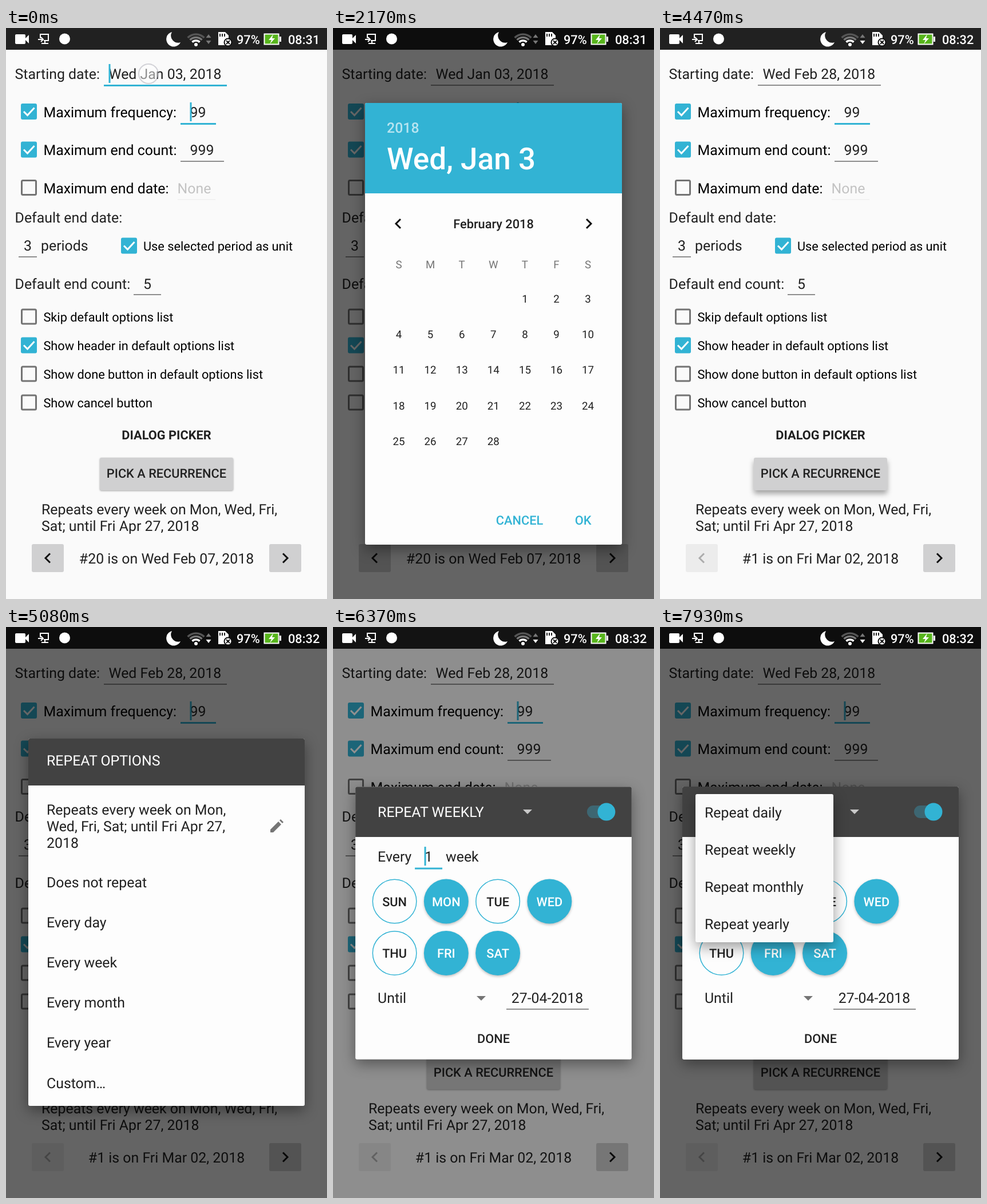
An HTML page that plays this animation: 561x998 px, repeating every 7.99 s.

```html
<!DOCTYPE html>
<html lang="en">
<head>
<meta charset="utf-8">
<title>Recurrence picker demo</title>
<style>
html, body { margin: 0; width: 100%; height: 100%; overflow: hidden; background: #fafafa; }
svg { display: block; width: 561px; height: 998px; }
text { font: 24.86px Roboto, sans-serif; fill: #212121; text-rendering: geometricPrecision; }
text.s { font-size: 21.77px; }
text.d { font-size: 18.7px; }
text.h { font-size: 53px; }
text.m { font-weight: 500; }
text.b { font-weight: 700; }
text.c { text-anchor: middle; }
text.k { fill: #000; }
text.w { fill: #fff; }
text.g { fill: #757575; }
text.a { fill: #32b3d4; }
.shadow { filter: drop-shadow(0 8px 12px rgba(0,0,0,.4)); }
</style>
</head>
<body>
<svg id="stage" viewBox="0 0 561 998"></svg>
<script>
const ACCENT = '#32b3d4', BUTTON = '#d0d0d1', LOOP = 7990;

const text = (x, y, str, cls = '', extra = '') => `<text x="${x}" y="${y}" class="${cls}" ${extra}>${str}</text>`;
const rect = (x, y, w, h, fill, extra = '') => `<rect x="${x}" y="${y}" width="${w}" height="${h}" fill="${fill}" ${extra}/>`;
const circle = (x, y, r, fill, extra = '') => `<circle cx="${x}" cy="${y}" r="${r}" fill="${fill}" ${extra}/>`;
const path = (d, fill, extra = '') => `<path d="${d}" fill="${fill}" ${extra}/>`;
const group = (id, body, extra = '') => `<g id="${id}" ${extra}>${body}</g>`;
const line = (x1, x2, y) => rect(x1, y - .75, x2 - x1, 1.5, '#6b6b6b');
const caret = (id, x, y) => rect(x - 1.5, y, 3, 33, ACCENT, `id="${id}"`);
const triangle = (x, y, fill) => path(`M${x - 8} ${y - 4}h16l-8 8z`, fill);
const chevron = (x, y, dir) =>
  path(`M${x - 4 * dir} ${y - 8}l${8 * dir} 8l${-8 * dir} 8`, 'none', 'stroke="#111" stroke-width="3"');
const checkbox = (x, y, on) => on
  ? rect(x - 14, y - 14, 28, 28, ACCENT, 'rx="3"') +
    path(`M${x - 9} ${y}l6.5 6.5l12 -13`, 'none', 'stroke="#fff" stroke-width="3"')
  : rect(x - 12.5, y - 12.5, 25, 25, 'none', 'rx="2" stroke="#737373" stroke-width="3"');

function page() {
  const options = [['Skip default options list', 0], ['Show header in default options list', 1],
    ['Show done button in default options list', 0], ['Show cancel button', 0]];
  const limits = [['Maximum frequency:', 1], ['Maximum end count:', 1], ['Maximum end date:', 0]];
  return rect(0, 0, 561, 998, '#fafafa') + rect(0, 0, 561, 38, '#212121') +
    text(15.6, 89, 'Starting date:') + text(179.5, 89, '', '', 'id="startDate"') +
    line(171, 386, 100) + group('startFocus', rect(171, 99, 215, 3, ACCENT) + caret('startCaret', 181, 63)) +
    limits.map(([s, on], i) => checkbox(40, 146 + i * 66.5, on) + text(65.5, 155.8 + i * 66.5, s, 'k')).join('') +
    text(335.5, 156, '99', 'c') + rect(305, 166, 62, 3, ACCENT) + caret('pageCaret', 323, 130) +
    text(342.5, 222, '999', 'c') + line(305, 381, 233) +
    text(329, 289, 'None', 'c', 'style="fill:#c3c3c3"') + rect(300, 299, 66, 1.5, '#efefef') +
    text(15.6, 340, 'Default end date:') + text(38, 389, '3', 'c') + line(22, 54, 400) +
    text(61, 389, 'periods') + checkbox(215, 380.5, 1) + text(240, 389, 'Use selected period as unit', 's k') +
    text(15.6, 456, 'Default end count:') + text(247, 456, '5', 'c') + line(223, 271, 466) +
    options.map(([s, on], i) => checkbox(40, 504.5 + i * 50, on) + text(65.4, 513 + i * 50, s, 's k')).join('') +
    text(280.5, 718.5, 'DIALOG PICKER', 's b c') +
    rect(164, 751, 233, 57, BUTTON, 'id="pick" rx="3"') +
    text(280.4, 786, 'PICK A RECURRENCE', 's m c') +
    text(62, 849.5, 'Repeats every week on Mon, Wed, Fri,') + text(62, 879, 'Sat; until Fri Apr 27, 2018') +
    group('prev', rect(45, 902, 56, 49, BUTTON, 'rx="3"') + chevron(73, 926.5, -1)) +
    text(280.5, 936, '', 'c', 'id="occurrence"') +
    rect(460, 902, 56, 49, BUTTON, 'rx="3"') + chevron(488, 926.5, 1);
}

function statusBar() {
  const arc = (r, color) => path(`M${332 - r * .72} ${31 - r * .7}A${r} ${r} 0 0 1 ${332 + r * .72} ${31 - r * .7}`,
    'none', `stroke="${color}" stroke-width="3.5"`);
  return rect(16, 11, 18, 17, '#fff', 'rx="2"') + path('M34 18l6 -6v15l-6 -6z', '#fff') +
    path('M60 18v-7h14v11h-8M56 20h9m-4 -4l4 4l-4 4M62 27h12m-6 -5v5', 'none', 'stroke="#fff" stroke-width="2"') +
    circle(102.5, 19, 9.5, '#fff') +
    path('M290 7a13 13 0 1 0 15 18a12.5 12.5 0 0 1 -15 -18z', '#fff') +
    arc(20, '#555') + arc(14.5, '#777') + arc(9, '#fff') + circle(332, 29, 3, '#fff') +
    path('M349.5 17l4.5 -6l4.5 6z', '#777') + path('M349.5 22l4.5 6l4.5 -6z', '#777', 'id="download"') +
    path('M371 7h12l6 6v17h-18z', '#fff') + path('M374 10v5m4 -5v5m4 -5v5', 'none', 'stroke="#222" stroke-width="2"') +
    circle(388, 25, 6.5, '#fff', 'stroke="#111" stroke-width="2"') +
    path('M385 22l6 6m0 -6l-6 6', 'none', 'stroke="#111" stroke-width="2"') +
    text(403, 28, '97%', 's m w') +
    rect(451.5, 10.5, 25, 18, '#57b51c', 'stroke="#fff" stroke-width="2"') + rect(478, 15, 3, 9, '#fff') +
    path('M467 11l-8 10h5l-3 7l9 -10h-5z', '#fff') +
    text(493, 28, '', 's m w', 'id="clock"');
}

function month(title, first, days, picked, x) {
  const colX = i => 115 + i * 55.1;
  let out = text(280.5, 350, title, 's m c') +
    [...'SMTWTFS'].map((s, i) => text(colX(i), 420, s, 'd g c')).join('');
  for (let day = 1; day <= days; day++) {
    const cell = day + first - 1, row = Math.floor(cell / 7), cx = colX(cell % 7), cy = 473 + row * 62.3;
    if (day === picked) out += circle(cx, cy, 31, ACCENT, `id="pick${day}"`);
    out += text(cx, cy + 6.7, day, 'd c', day === picked ? `id="day${day}"` : '');
  }
  return `<g transform="translate(${x})">${out}</g>`;
}

function dateDialog() {
  return rect(56, 131, 449, 772, '#fdfdfd', 'rx="3" class="shadow"') +
    path('M56 289V134q0 -3 3 -3H502q3 0 3 3V289z', ACCENT) +
    text(94, 183, '2018', 'm w', 'opacity=".65"') + text(94, 247, '', 'h m w', 'id="headline"') +
    '<clipPath id="body"><rect x="56" y="289" width="449" height="525"/></clipPath>' +
    `<g clip-path="url(#body)">${group('months',
      month('January 2018', 1, 31, 3, 0) + month('February 2018', 4, 28, 28, 449))}</g>` +
    chevron(114, 342, -1) + chevron(447, 342, 1) +
    text(326, 868, 'CANCEL', 's m a c') + text(437, 868, 'OK', 's m a c');
}

const panel = (y, h, head) => rect(39, y, 483, h, '#fdfdfd', 'rx="3" class="shadow"') +
  path(`M39 ${y + head}V${y + 3}q0 -3 3 -3H519q3 0 3 3V${y + head}z`, '#424242');

function listDialog() {
  const items = ['Does not repeat', 'Every day', 'Every week', 'Every month', 'Every year', 'Custom…'];
  return panel(195, 642, 82) + text(71, 242, 'REPEAT OPTIONS', 'w') +
    ['Repeats every week on Mon,', 'Wed, Fri, Sat; until Fri Apr 27,', '2018']
      .map((s, i) => text(71, 328 + i * 29, s)).join('') +
    path('M462 359v-5l14 -14l5 5l-14 14zM478 338l2 -2l5 5l-2 2z', '#757575') +
    items.map((s, i) => text(71, 455 + i * 70.1, s)).join('');
}

function customDialog() {
  const days = ['SUN', 'MON', 'TUE', 'WED', 'THU', 'FRI', 'SAT'].map((s, i) => {
    const on = [1, 3, 5, 6].includes(i), x = 107.5 + i % 4 * 90.3, y = i < 4 ? 479.5 : 570;
    return (on ? circle(x, y, 39, ACCENT, 'style="filter:drop-shadow(0 2px 2px rgba(0,0,0,.25))"')
      : circle(x, y, 38.3, '#fdfdfd', `stroke="${ACCENT}" stroke-width="1.5"`)) +
      text(x, y + 8, s, 's m c' + (on ? ' w' : ''));
  }).join('');
  return panel(279, 477, 88) + text(78, 332, 'REPEAT WEEKLY', 'w') + triangle(340, 323, '#c8c8c8') +
    rect(444, 312, 46, 22, '#3d6672', 'rx="11"') + circle(478, 323, 15.5, ACCENT) +
    text(78, 410, 'Every') + text(167, 410, '1', 'c') + rect(143, 420.5, 48, 3, ACCENT) +
    caret('dialogCaret', 161, 384) + text(197, 410, 'week') + days +
    text(78, 657, 'Until') + triangle(259, 649, '#757575') +
    text(374.5, 657, '27-04-2018', 'c') + line(303, 447, 668) + text(280.5, 727, 'DONE', 's m c');
}

const popup = () => rect(62, 292, 241, 259, '#fafafa', 'rx="3" class="shadow"') +
  ['daily', 'weekly', 'monthly', 'yearly'].map((s, i) => text(78, 333 + i * 65, 'Repeat ' + s)).join('');

document.getElementById('stage').innerHTML = group('page', page()) +
  rect(0, 0, 561, 998, '#000', 'id="scrim"') + statusBar() +
  group('date', dateDialog()) + group('list', listDialog()) + group('custom', customDialog()) +
  circle(0, 0, 0, '#888', 'id="ripple"') + group('popup', popup()) +
  circle(0, 0, 17, 'rgba(255,255,255,.5)', 'id="finger" stroke="rgba(90,90,110,.25)" stroke-width="2"');

const $ = id => document.getElementById(id);
const ramp = (t, a, b) => Math.min(1, Math.max(0, (t - a) / (b - a)));
const easeOut = k => 1 - (1 - k) ** 3;
const set = (id, attrs) => { for (const k in attrs) $(id).setAttribute(k, attrs[k]); };
const show = (id, on) => set(id, { opacity: +on });

// id, opening time, closing time, centre y
const dialogs = [['date', 150, 3400, 517], ['list', 4600, 5957, 516], ['custom', 6190, 1e5, 517]];
// x, y, press, release, ripple radius
const taps = [[249, 80, -100, 130, 0], [447, 342, 1350, 1470, 36], [280, 722, 2640, 2760, 0],
  [437, 838, 3270, 3510, 0], [280, 778, 4270, 4400, 0], [472, 348, 5690, 5810, 36], [340, 323, 7180, 7300, 33]];

function draw(t) {
  const changed = t >= 3400, selected = t >= 2700;
  $('startDate').textContent = changed ? 'Wed Feb 28, 2018' : 'Wed Jan 03, 2018';
  $('occurrence').textContent = changed ? '#1 is on Fri Mar 02, 2018' : '#20 is on Wed Feb 07, 2018';
  $('clock').textContent = t < 3900 ? '08:31' : '08:32';
  $('headline').textContent = selected ? 'Wed, Feb 28' : 'Wed, Jan 3';
  set('prev', { opacity: changed ? .33 : 1 });
  set('download', { fill: changed ? '#fff' : '#777' });
  set('startFocus', { opacity: 1 - ramp(t, 70, 200) });
  show('pageCaret', t < 4020 || t > 4520);
  show('dialogCaret', t < 6950 || t > 7450);

  let dim = 0;
  for (const [id, open, close, cy] of dialogs) {
    const scale = .9 + .1 * easeOut(ramp(t, open, open + 220));
    dim = Math.max(dim, ramp(t, open, open + 250) * (1 - ramp(t, close, close + 320)));
    const alpha = Math.min(ramp(t, open, open + 150), 1 - ramp(t, close, close + 150));
    set(id, { opacity: alpha, transform: `translate(280.5 ${cy}) scale(${scale}) translate(-280.5 ${-cy})` });
  }
  set('scrim', { opacity: .6 * dim });

  set('months', { transform: `translate(${-449 * easeOut(ramp(t, 1450, 2050))})` });
  set('pick28', { r: 31 * ramp(t, 2700, 2850) });
  set('day3', { style: 'fill:#fff' });
  set('day28', { style: `fill:${selected ? '#fff' : '#212121'}` });

  const lift = ramp(t, 4270, 4420) * (1 - ramp(t, 4580, 4780));
  $('pick').style.filter = `drop-shadow(0 ${1.5 + 4.5 * lift}px ${1.5 + 3.5 * lift}px rgba(0,0,0,.35))`;

  const unroll = easeOut(ramp(t, 7350, 7600)), hidden = 1 - unroll;
  set('popup', { opacity: ramp(t, 7350, 7450) });
  $('popup').style.clipPath = unroll < 1 ? `inset(${98 * hidden}px 0px ${161 * hidden}px 0px)` : 'none';

  const [x, y, down, up, radius] = taps.filter(tap => t >= tap[2]).pop();
  set('finger', { cx: x, cy: y, opacity: 1 - ramp(t, up, up + 50) });
  set('ripple', { cx: x, cy: y, r: radius * ramp(t, down, down + 220), opacity: .25 * (1 - ramp(t, up, up + 200)) });
}

function tick() {
  draw(performance.now() % LOOP);
  requestAnimationFrame(tick);
}
tick();
</script>
</body>
</html>
```
